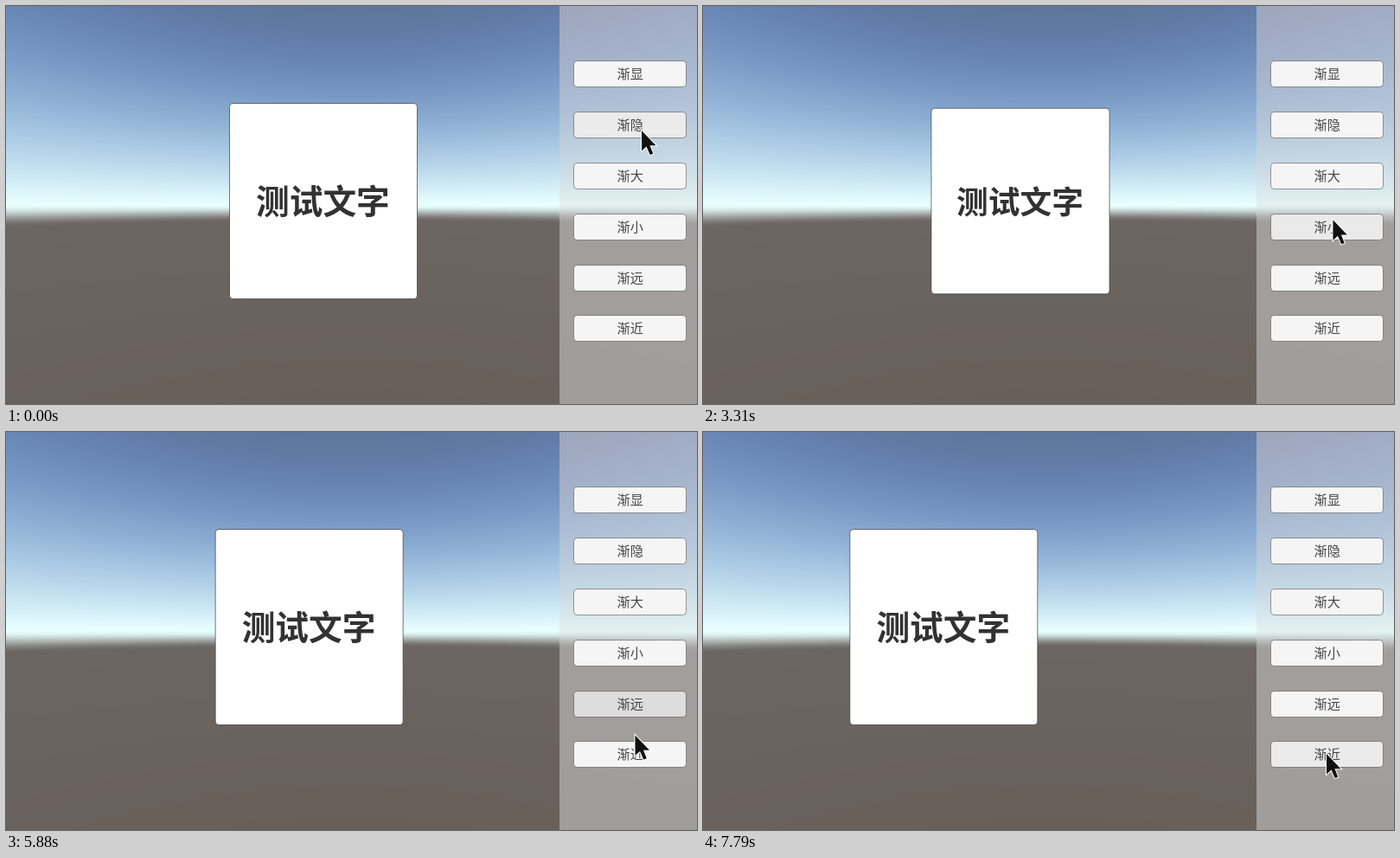
An HTML page with a canvas that plays this animation: 799x460 px, repeating every 7860 ms.

```html
<!DOCTYPE html>
<html lang="zh-CN">
<head>
<meta charset="utf-8">
<title>渐变动画</title>
<style>
  html, body { margin: 0; width: 100%; height: 100%; overflow: hidden; }
  canvas { display: block; }
</style>
</head>
<body>
<canvas id="stage" width="799" height="460"></canvas>
<script>
const W = 799, H = 460, LOOP = 7860, STEP = 70, DURATION = 1000, TRAVEL = 650;
const ctx = document.getElementById('stage').getContext('2d');
const FONT = '"Noto Sans CJK SC", "Noto Sans CJK", sans-serif';

// The picture advances in steps of 70 ms, restarting at each of these times.
const BURSTS = [0, 900, 1640, 2490, 3100, 4420, 5740, 6900, 7440];

const ZENITH = [95, 119, 154], GLOW = [232, 255, 255], FALLOFF = [2.1, 1.75, 1.1];
const GROUND = [108, 101, 98], NADIR = [104, 95, 88];
const SIDE = { x: 640, alpha: 0.392, light: 0.68 };
const CARD = { x: 258, y: 112, w: 218, h: 227 };
const BUTTONS = ['渐显', '渐隐', '渐大', '渐小', '渐远', '渐近']
  .map((label, i) => ({ label, x: 656, y: Math.round(63.4 + 58.8 * i), w: 131, h: 31 }));

// Each click starts one eased second: fade out, fade in, shrink, grow, leave, return.
const CLICKS = [
  { start: 178, button: 1 }, { start: 1740, button: 0 }, { start: 3174, button: 3 },
  { start: 4503, button: 2 }, { start: 5795, button: 4 }, { start: 6997, button: 5 }
];
const PRESS_LEAD = 95;

// Where the pointer comes to rest: arrival time, x, y.
const STOPS = [
  [0, 735, 144], [850, 732, 82], [2450, 727, 252], [3850, 746, 189], [5130, 730, 290],
  [5400, 736, 357], [5560, 731, 318], [6200, 724, 383], [6370, 721, 372]
];
const ARROW = new Path2D('M0 0V23.5L5.5 18.5L9.7 28L13.3 26.7L9.5 17.3H16.5Z');

const clamp = v => Math.max(0, Math.min(1, v));
const mix = (a, b, k) => a + (b - a) * k;
const smooth = k => k * k * (3 - 2 * k);
const toLinear = v => (v /= 255) <= 0.04045 ? v / 12.92 : ((v + 0.055) / 1.055) ** 2.4;
const toByte = v => 255 * (v <= 0.0031308 ? v * 12.92 : 1.055 * v ** (1 / 2.4) - 0.055);

function layer(w, h, paint) {
  const c = document.createElement('canvas');
  c.width = w;
  c.height = h;
  paint(c.getContext('2d'));
  return c;
}

// Colour by elevation, given as a height on the vertical centre line.
function skyColor(level) {
  const rise = clamp(level / 228), haze = smooth(clamp((level - 229) / 19));
  const depth = clamp((level - 248) / 212);
  return ZENITH.map((z, i) => mix(
    mix(z, GLOW[i], rise ** FALLOFF[i]), mix(GROUND[i], NADIR[i], depth), haze));
}

// Seen with a 60 degree field of view.
const backdrop = layer(W, H, g => {
  const image = g.createImageData(W, H), focus = 230 / Math.tan(Math.PI / 6);
  for (let y = 0, p = 0; y < H; y++) {
    for (let x = 0; x < W; x++, p += 4) {
      let rgb = skyColor(230 + (y - 230) * focus / Math.hypot(focus, x - 399.5));
      if (x >= SIDE.x) rgb = rgb.map(v => toByte(mix(toLinear(v), SIDE.light, SIDE.alpha)));
      image.data.set([...rgb.map(Math.round), 255], p);
    }
  }
  g.putImageData(image, 0, 0);
});

function box(g, { x, y, w, h }, fill, line) {
  g.beginPath();
  g.roundRect(x + 0.5, y + 0.5, w - 1, h - 1, 4);
  g.fillStyle = fill;
  g.fill();
  g.strokeStyle = line;
  g.lineWidth = 1;
  g.stroke();
}

function caption(g, text, x, y, size, weight, color) {
  g.font = `${weight} ${size}px ${FONT}`;
  g.textAlign = 'center';
  g.textBaseline = 'alphabetic';
  g.fillStyle = color;
  g.fillText(text, x, y + size * 0.37);
}

const paintSheet = g => box(g, { ...CARD, x: 0, y: 0 }, '#fff', 'rgba(45,45,45,.65)');
const paintWords = g => caption(g, '测试文字', CARD.w / 2 - 0.6, 114, 38.7, 700, '#323232');

const pixels = (c, x = 0, y = 0) => c.getContext('2d').getImageData(x, y, CARD.w, CARD.h).data;
const behind = pixels(backdrop, CARD.x, CARD.y);
const sheets = [paintSheet, paintWords].map(paint => pixels(layer(CARD.w, CARD.h, paint)));
const linear = Array.from({ length: 256 }, (_, v) => toLinear(v));

// Fading blends in linear light, sheet first and words over it.
function drawFadedCard(alpha) {
  const out = new ImageData(CARD.w, CARD.h);
  for (let p = 0; p < out.data.length; p++) {
    if (p % 4 === 3) { out.data[p] = 255; continue; }
    let v = linear[behind[p]];
    for (const s of sheets) v = mix(v, linear[s[p]], alpha * s[p | 3] / 255);
    out.data[p] = Math.round(toByte(v));
  }
  ctx.putImageData(out, CARD.x, CARD.y);
}

function drawCard(t) {
  const [fadeOut, fadeIn, shrink, grow, leave, comeBack] =
    CLICKS.map(({ start }) => smooth(clamp((t - start) / DURATION)));
  const alpha = 1 - fadeOut + fadeIn;
  const scale = 1 - shrink + grow;
  const shift = -800 * (leave - comeBack);
  if (alpha <= 0 || scale <= 0) return;
  if (alpha < 1) return drawFadedCard(alpha);
  ctx.save();
  ctx.translate(CARD.x + CARD.w / 2 + shift, CARD.y + CARD.h / 2);
  ctx.scale(scale, scale);
  ctx.translate(-CARD.w / 2, -CARD.h / 2);
  paintSheet(ctx);
  paintWords(ctx);
  ctx.restore();
}

function drawButtons(t, [px, py]) {
  const click = CLICKS.filter(c => c.start - PRESS_LEAD <= t).pop();
  const press = click ? clamp(1 - Math.abs(t - click.start) / 140) : 0;
  BUTTONS.forEach((b, i) => {
    const hover = px >= b.x && px <= b.x + b.w && py >= b.y && py <= b.y + b.h;
    const selected = click && i === click.button;
    let shade = hover || selected ? 235 : 245;
    if (selected) shade = Math.round(mix(shade, 200, press));
    box(ctx, b, `rgb(${shade},${shade},${shade})`, 'rgba(60,60,60,.5)');
    caption(ctx, b.label, b.x + b.w / 2 + 0.2, b.y + b.h / 2, 15.2, 300, '#464646');
  });
}

function pointerAt(t) {
  const i = STOPS.findIndex(stop => stop[0] > t);
  if (i < 0) return STOPS[STOPS.length - 1].slice(1);
  const [before, x0, y0] = STOPS[i - 1], [arrival, x1, y1] = STOPS[i];
  const departure = Math.max(before, arrival - TRAVEL);
  const k = smooth(clamp((t - departure) / (arrival - departure)));
  return [mix(x0, x1, k), mix(y0, y1, k)];
}

function drawPointer([x, y]) {
  ctx.save();
  ctx.translate(x, y);
  ctx.lineWidth = 2;
  ctx.strokeStyle = '#fff';
  ctx.stroke(ARROW);
  ctx.fillStyle = '#111';
  ctx.fill(ARROW);
  ctx.restore();
}

function frame(now) {
  const time = now % LOOP;
  const start = BURSTS.filter(b => b <= time).pop();
  const t = start + Math.floor((time - start) / STEP) * STEP;
  const pointer = pointerAt(t);
  ctx.drawImage(backdrop, 0, 0);
  drawCard(t);
  drawButtons(t, pointer);
  drawPointer(pointer);
}

const origin = performance.now();
(function tick() {
  frame(performance.now() - origin);
  requestAnimationFrame(tick);
})();
</script>
</body>
</html>
```
